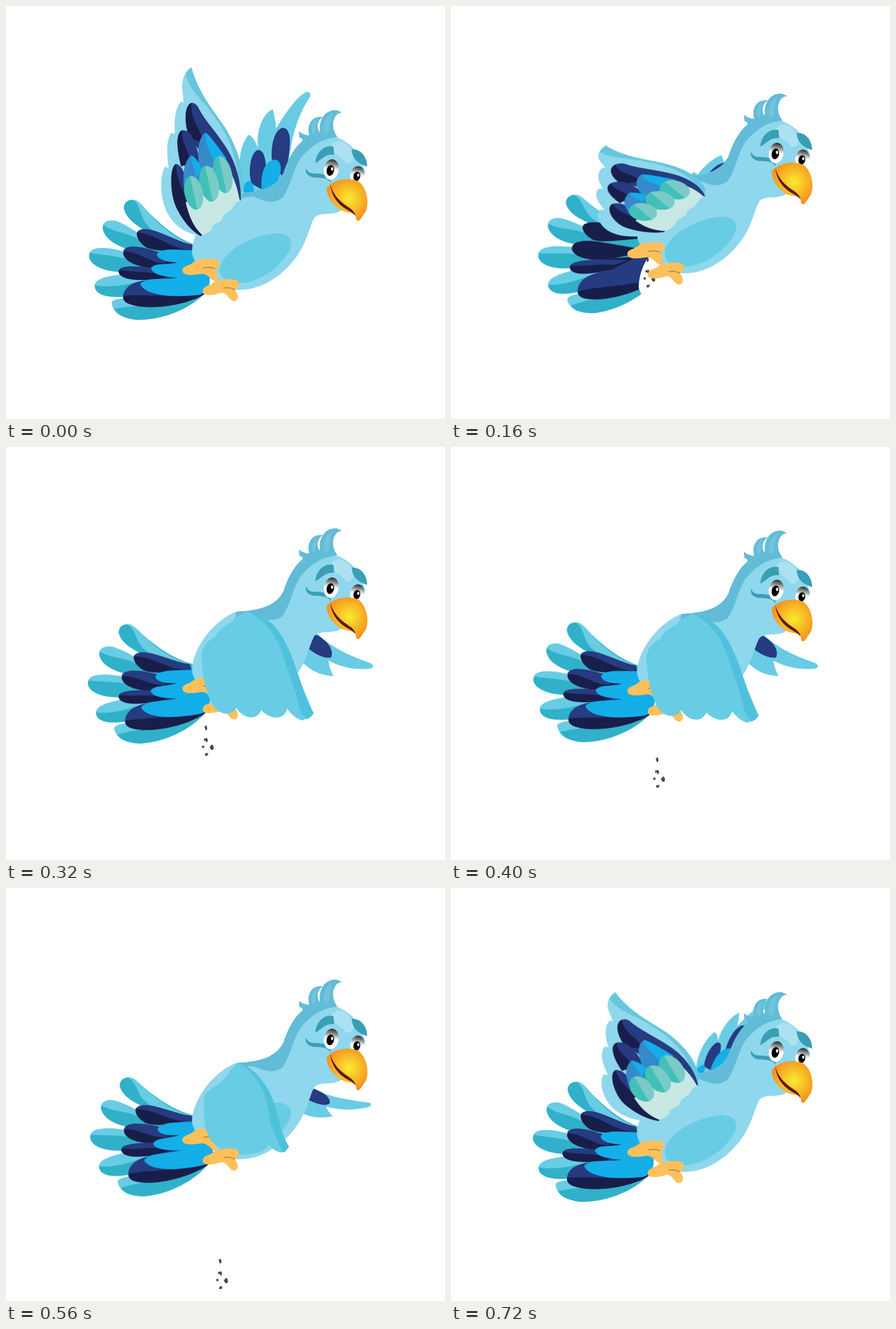
These frames come from a looping animation (772x725 px, 0.84 s). An HTML page:

```html
<!DOCTYPE html>
<html lang="en">
<head>
<meta charset="utf-8">
<title>Flying bird</title>
<style>
  html, body { margin: 0; width: 100%; height: 100%; overflow: hidden; background: #fff; }
  svg { display: block; width: 100vw; height: 100vh; }

  .sky { fill: #8ed7ec; }
  .aqua { fill: #68cce5; }
  .edge { fill: #50c1dc; }
  .rim { fill: #66c6dd; }
  .shade { fill: #62bcd7; }
  .sea { fill: #30b1c9; }
  .navy { fill: #263b80; }
  .night { fill: #171e49; }
  .azure { fill: #14aee8; }
  .blue { fill: #358aca; }
  .mint { fill: #c8e8e4; }
  .brow { fill: #3a9eb5; }
  .foot { fill: #ffc05c; }
  .crease { fill: none; stroke: #a8803f; stroke-width: 1.6; stroke-linecap: round; }

  .bob, .tail, .lit, .near, .far, .back, .front, .fold, .down, .drop {
    animation: bob 840ms step-end infinite;
  }
  .tail { animation-name: tail; transform-origin: 356px 410px; }
  .lit { animation-name: lit; }
  .near { animation-name: near; }
  .far { animation-name: far; }
  .back { animation-name: back; }
  .front { animation-name: front; }
  .fold { animation-name: fold; }
  .down { animation-name: down; }
  .drop { animation-name: drop; }

  @keyframes bob {
    0% { transform: translateY(0); }
    9.52% { transform: translateY(-14px); }
    19.04% { transform: translateY(-29px); }
    28.57% { transform: translateY(-59px); }
    38.09% { transform: translateY(-40px); }
    47.61% { transform: translateY(-36px); }
    57.14% { transform: translateY(-31px); }
    66.66% { transform: translateY(-22px); }
    76.19% { transform: translateY(-13px); }
    85.71%, 100% { transform: translateY(0); }
  }
  @keyframes tail {
    0% { transform: none; }
    9.52% { transform: rotate(-4deg); }
    19.04% { transform: translate(1.5px, 1px) rotate(-8deg); }
    28.57% { transform: translate(-4px, 0) rotate(-14deg); }
    38.09% { transform: translate(-5px, 0) rotate(-4.6deg); }
    47.61% { transform: translate(-2px, 0) rotate(-1.5deg); }
    57.14% { transform: translate(2px, 0) rotate(.7deg); }
    66.66% { transform: translate(-2px, 0) rotate(-6deg); }
    76.19% { transform: translate(-4px, 1px) rotate(-11deg); }
    85.71%, 100% { transform: translate(-2px, 0); }
  }
  @keyframes lit {
    0% { opacity: 1; }
    19.04% { opacity: 0; }
    28.57%, 100% { opacity: 1; }
  }
  @keyframes near {
    0% { opacity: 1; transform: none; }
    9.52% { opacity: 1; transform: matrix(1.168, -.199, .19, .775, -112.4, 164.3); }
    19.04% { opacity: 1; transform: matrix(1.272, -.424, .275, .538, -172.4, 354); }
    28.57% { opacity: 0; transform: none; }
    76.19% { opacity: 1; transform: matrix(1.272, -.424, .275, .538, -172.4, 355); }
    85.71%, 100% { opacity: 1; transform: matrix(1.168, -.199, .19, .775, -112.4, 164.3); }
  }
  @keyframes far {
    0% { opacity: 1; transform: none; }
    9.52% { opacity: 1; transform: matrix(.777, -.052, -.2525, .707, 188.3, 115.4); }
    19.04% { opacity: 0; transform: none; }
    85.71%, 100% { opacity: 1; transform: matrix(.777, -.052, -.2525, .707, 188.3, 115.4); }
  }
  @keyframes back {
    0% { opacity: 0; }
    19.04% { opacity: 1; }
    28.57%, 100% { opacity: 0; }
  }
  @keyframes front {
    0% { opacity: 0; }
    76.19% { opacity: 1; }
    85.71%, 100% { opacity: 0; }
  }
  @keyframes fold {
    0% { opacity: 0; }
    28.57% { opacity: 1; }
    38.09% { opacity: 0; }
    66.66% { opacity: 1; }
    76.19%, 100% { opacity: 0; }
  }
  @keyframes down {
    0% { opacity: 0; }
    38.09% { opacity: 1; }
    66.66%, 100% { opacity: 0; }
  }
  @keyframes drop {
    0% { opacity: 0; transform: translate(345px, 445px); }
    19.04% { opacity: 1; transform: translate(345px, 445px); }
    28.57% { opacity: 1; transform: translate(349px, 442px); }
    38.09% { opacity: 1; transform: translate(351px, 493px); }
    47.61% { opacity: 1; transform: translate(362px, 549px); }
    57.14% { opacity: 1; transform: translate(372px, 604px); }
    66.66% { opacity: 1; transform: translate(376px, 655px); }
    76.19% { opacity: 1; transform: translate(380px, 702px); }
    85.71%, 100% { opacity: 0; transform: translate(380px, 702px); }
  }
</style>
</head>
<body>
<svg viewBox="0 0 772 725">
  <defs>
    <radialGradient id="beak" gradientUnits="userSpaceOnUse" cx="603" cy="338" r="38">
      <stop stop-color="#f9ec31"/><stop offset="1" stop-color="#f7941e"/>
    </radialGradient>
    <linearGradient id="eye" x2="0" y2="1">
      <stop offset=".02" stop-color="#333"/><stop offset=".5" stop-color="#fff"/>
    </linearGradient>
    <linearGradient id="teal">
      <stop offset=".5" stop-color="#42c0b8"/><stop offset=".5" stop-color="#7acbc6"/>
    </linearGradient>

    <g id="farWing">
      <path class="aqua" d="M418 327C408 300 405 250 427 226C435 230 440 240 443 250C440 220 450 190 469 181C473 195 474 205 475 215C490 190 510 160 528 151C536 150 537 157 533 162C515 190 505 220 500 255L490 310L440 330Z"/>
      <path class="navy" d="M486 214C470 218 465 250 468 275L488 302C497 275 500 250 499 230C497 218 492 213 486 214ZM442 253C430 258 425 290 432 312L450 322C458 300 460 275 452 258Q447 252 442 253Z"/>
      <path class="azure" d="M470 270C452 275 447 300 450 327L475 322L483 290C485 275 478 268 470 270ZM427 307C418 310 417 320 418 328L436 327C436 315 433 307 427 307Z"/>
    </g>

    <g id="flatWing">
      <path class="aqua" d="M430 330L417 308L426 291L434 296C446 280 462 266 476 262L480 274C500 254 528 236 548 227C565 218 580 213 592 212C588 222 575 232 558 238C543 250 535 264 525 282C510 305 480 325 450 331Z"/>
      <path class="navy" d="M534 251C520 249 498 272 497 287L503 297C520 285 537 262 534 251ZM483 275C468 275 450 292 445 312L454 322C470 306 484 290 483 275ZM430 298C424 298 418 304 417 308L430 315Q434 306 430 298Z"/>
      <path class="azure" d="M499 283C484 282 468 302 449 329C475 318 497 305 499 283ZM449 305C441 308 433 318 432 324L446 329Q450 316 449 305Z"/>
    </g>

    <g id="nearWing">
      <path class="sky" d="M326 108C318 112 308 125 310 148Q312 160 312 170L308 167C298 178 295 200 297 225L291 222C282 235 282 255 286 285L280 282C271 295 270 330 280 355C290 380 310 398 340 403L411 342C418 300 415 265 385 215C365 182 340 155 326 108Z"/>
      <path class="rim" d="M326 108C320 112 315 118 316 122C325 150 345 165 360 185C385 220 410 255 412 340L417 326C420 285 405 245 385 213C365 182 341 160 326 108Z"/>
      <path class="navy" d="M326 170C312 175 314 210 322 230L375 300L413 342C414 310 405 275 385 245C365 215 348 199 337 176Q332 169 326 170Z"/>
      <path class="night" d="M326 170C312 175 315 210 323 232L346 240C344 215 323 200 326 170Z"/>
      <path class="navy" d="M310 218C298 223 300 250 308 278L335 290C345 270 335 245 325 225Q317 217 310 218Z"/>
      <path class="night" d="M310 218C298 223 300 250 308 282L322 275C325 255 308 245 310 218Z"/>
      <path class="night" d="M299 277C287 282 288 330 300 355C310 375 325 395 343 404L350 395L325 340Z"/>
      <path class="navy" d="M299 277C310 280 316 295 319 320L318 345C312 320 299 305 299 277Z"/>
      <path class="mint" d="M316 345C322 370 330 388 345 402Q357 399 362 391C362 380 375 383 380 374C383 361 396 362 400 352Q405 343 411 342C408 322 402 305 392 285Z"/>
      <path class="blue" d="M351 222C337 230 335 262 342 290L376 280L380 265C372 248 361 230 351 222ZM326 262C312 272 310 300 314 325L345 308C345 285 335 270 326 262Z"/>
      <path class="azure" d="M351 222C361 230 375 250 388 268L368 282C364 258 347 244 351 222ZM326 262C335 268 341 276 343 285L334 303C334 285 324 278 326 262Z"/>
      <g fill="url(#teal)">
        <ellipse cx="381" cy="296" rx="16.5" ry="33" transform="rotate(-12 381 296)"/>
        <ellipse cx="357" cy="312" rx="16.5" ry="32" transform="rotate(-12 357 312)"/>
        <ellipse cx="330" cy="328" rx="16" ry="30" transform="rotate(-12 330 328)"/>
      </g>
    </g>
  </defs>

  <!-- lowered far wing holds still while the body bobs -->
  <g class="down">
    <path class="aqua" d="M548 328C570 350 600 365 640 379C648 383 646 388 640 389C615 392 590 387 567 375Q569 390 576 402C550 402 530 388 519 375Z"/>
    <path class="navy" d="M545 329C565 340 577 355 572 369C560 373 540 362 529 351L535 328Z"/>
  </g>

  <g class="bob">
    <g class="fold"><g transform="translate(0 59)">
      <path class="aqua" d="M538 314C560 328 600 335 640 340C645 344 640 348 630 349C605 354 585 352 563 347Q567 357 575 364C550 368 530 366 512 352Z"/>
      <path class="navy" d="M540 315C560 322 572 332 569 341C562 348 540 340 526 332L530 315Z"/>
    </g></g>
    <g class="far"><use href="#farWing"/></g>
    <g class="back"><use href="#flatWing" y="29"/></g>

    <g class="tail">
      <path class="sea" d="M335 432C280 410 213 390 207 354C208 340 223 337 233 344C258 370 290 405 335 420Z"/>
      <path class="aqua" d="M222 340C230 340 235 345 240 350C262 377 292 408 333 421C290 411 262 402 246 382C235 367 237 348 222 340Z"/>
      <path class="sea" d="M170 388C172 374 190 374 202 381C225 392 240 405 258 415L330 425L330 450L262 440C240 435 230 431 215 427C190 420 170 405 170 388Z"/>
      <path class="aqua" d="M171 384C176 374 192 375 202 381C225 392 240 405 258 415L250 425C225 395 195 402 171 384Z"/>
      <path class="sea" d="M146 440C146 423 165 424 185 426L240 440L330 445L330 475L200 467C165 465 147 452 146 440Z"/>
      <path class="aqua" d="M147 433C153 423 168 425 185 426L225 434L240 455C205 437 180 440 147 433Z"/>
      <path class="sea" d="M156 490C160 476 185 474 205 471L300 485L215 510C180 513 155 508 156 490Z"/>
      <path class="aqua" d="M156 490C160 476 185 474 205 471L260 478L215 488C195 492 175 494 156 490Z"/>
      <path class="sea" d="M186 520C190 512 215 514 240 515L349 505C320 535 270 552 230 551C205 548 188 540 186 520Z"/>
      <path class="aqua" d="M186 520C190 512 215 512 240 515L335 516C280 527 230 523 190 532Q186 526 186 520Z"/>

      <path class="night" d="M230 400C230 390 250 391 265 396C290 405 310 416 327 419L330 433C300 430 262 432 245 423C235 415 230 408 230 400Z"/>
      <path class="navy lit" d="M231 397C236 389 250 391 265 396C290 405 310 416 327 419L328 429C285 426 270 402 231 397Z"/>
      <path class="night" d="M206 434C208 418 235 422 255 428L315 447L315 458L270 461C235 460 208 450 206 434Z"/>
      <path class="navy lit" d="M206 430C211 418 235 422 255 428L285 440L280 452C250 450 235 432 206 430Z"/>
      <path class="night" d="M198 466C199 454 230 457 255 459L320 463L315 478L245 481C215 482 198 476 198 466Z"/>
      <path class="navy" d="M199 463C203 455 230 457 255 459L300 467L275 472C245 465 225 468 199 463Z"/>
      <path class="navy" d="M206 508C210 485 240 480 270 480C300 470 320 462 350 455L357 487L349 506C320 524 270 530 240 528C215 525 204 520 206 508Z"/>
      <path class="night" d="M206 509C240 505 300 513 349 506C320 524 270 531 240 528C215 525 205 519 206 509Z"/>
      <path class="azure lit" d="M265 436C272 424 300 428 330 429L360 450L358 487Q352 504 340 507C300 512 245 510 236 488C245 475 280 481 302 477C280 476 256 471 255 460C262 450 285 455 302 450C285 450 267 446 265 436Z"/>
    </g>
  </g>

  <g class="drop">
    <path fill="#fff" d="M6-10C-6 5-15 28-15 50L-10 62H20L24 0Z"/>
    <path fill="#4a4a4a" d="M-2-3l4-1 1 6-3 3-1-4ZM-3 19l6-1 1 5-3 3-1-4-3 1ZM-7 32l4-1 1 3-3 2ZM7 34l4-5 3 3v6l-4 1ZM-1 45l6-1-2 5h-4Z"/>
  </g>

  <g class="bob">
    <path class="sky" d="M327 430C330 390 365 345 405 329C450 327 475 318 488 293C498 262 515 240 545 231Q562 226 580 230C598 236 613 249 622 264L632 292L592 357C575 371 555 359 542 372C533 388 529 420 504 449C476 482 440 501 402 498C375 494 362 482 357 463C340 460 328 448 327 430Z"/>
    <path class="aqua" d="M376 462C378 430 440 398 480 399C505 401 508 420 490 442C470 468 440 485 410 487C385 487 375 475 376 462Z"/>
    <path class="shade" d="M405 329C450 327 475 318 488 293C498 262 512 242 526 234L580 230C550 235 535 248 519 266C506 283 500 318 486 337C467 350 452 341 436 335Q420 333 403 343Z"/>
    <path class="shade" d="M515 220Q524 227 533 227C528 205 541 192 557 195C546 202 546 215 552 222C549 198 563 181 582 183L591 187C575 188 569 213 583 230L545 236L521 243Q524 232 516 231Z"/>
    <path fill="#72c4dc" d="M549 196C538 203 535 215 540 225C548 226 542 205 549 196ZM575 187C560 195 556 212 560 222C573 230 565 205 575 187Z"/>

    <g class="front"><use href="#flatWing" y="13"/></g>

    <path fill="#ade1f2" d="M573 243C583 232 597 237 606 250C616 268 609 278 598 276C590 262 574 264 573 243Z"/>
    <path class="brow" d="M544 276C545 257 560 243 576 247L577 261C562 259 555 270 544 276ZM608 252C625 250 636 268 635 282C623 278 609 271 608 252Z"/>
    <path class="brow" d="M528 285C532 297 543 293 555 295Q571 297 571 311C566 300 552 302 542 301C531 300 525 292 528 285Z"/>
    <ellipse cx="572" cy="287" rx="13" ry="18" fill="url(#eye)" transform="rotate(10 572 287)"/>
    <ellipse cx="618" cy="297" rx="12.5" ry="16" fill="url(#eye)" transform="rotate(10 618 297)"/>
    <ellipse cx="570.5" cy="288.5" rx="6.5" ry="9.5" transform="rotate(12 570 288)"/>
    <ellipse cx="617" cy="299" rx="6" ry="8" transform="rotate(12 617 299)"/>
    <g fill="#fff">
      <ellipse cx="573.5" cy="286" rx="2" ry="3"/><ellipse cx="619.5" cy="297" rx="2" ry="2.8"/>
    </g>
    <path fill="url(#beak)" d="M564 319C575 306 600 299 620 308C635 320 639 345 633 360L622 376Q615 380 615 368C612 361 596 365 584 355C570 344 564 332 564 319Z"/>
    <path fill="#5c1a12" d="M570 313C576 334 590 345 602 353Q613 360 615 369C608 360 602 360 594 354C582 345 573 334 570 313Z"/>

    <path class="foot" d="M310 464C311 455 325 456 331 448C340 443 360 443 372 445C378 450 376 460 368 461C374 468 373 478 368 483C360 482 358 472 345 470C325 473 311 474 310 464Z"/>
    <path class="crease" d="M347 460Q357 457 367 461"/>
    <g class="fold"><g transform="translate(0 59)">
      <path class="aqua" d="M408 270C395 278 388 298 375 306C358 318 345 322 348 342C347 370 350 392 362 408C377 424 392 430 412 431C435 431 455 428 463 412L480 400C480 350 445 285 408 270Z"/>
      <path class="edge" d="M408 269C438 285 458 320 463 362C466 382 464 397 460 411C470 424 485 429 491 426L498 417C486 400 480 370 473 345C462 308 436 278 408 269Z"/>
      <path class="aqua" d="M460 411C470 424 480 428 487 427C478 410 470 390 463 370Z"/>
    </g></g>
    <path class="foot" d="M346 500C347 490 360 492 366 484C378 478 398 478 408 482C412 490 408 497 402 498C408 504 411 514 403 518C392 519 392 506 380 503C362 509 345 510 346 500Z"/>
    <path class="crease" d="M383 495Q393 493 402 498"/>

    <g class="down"><g transform="translate(0 41)">
      <path class="aqua" d="M424 287C405 300 400 296 400 305C385 312 375 318 368 332C352 342 342 350 344 374C345 400 352 430 362 450C372 468 395 474 405 457C415 474 440 482 449 461C465 478 490 480 495 457C505 472 520 482 535 474L541 467L490 345C475 315 450 295 424 287Z"/>
      <path class="edge" d="M421 287C458 300 478 335 487 365C498 400 510 425 515 455Q520 470 529 477Q540 470 541 466C522 435 513 385 494 348C478 313 455 291 421 287Z"/>
      <path class="aqua" d="M490 452Q505 476 522 479C528 477 526 472 520 468L505 425Z"/>
    </g></g>
    <g class="near"><use href="#nearWing"/></g>
  </g>
</svg>
</body>
</html>
```
